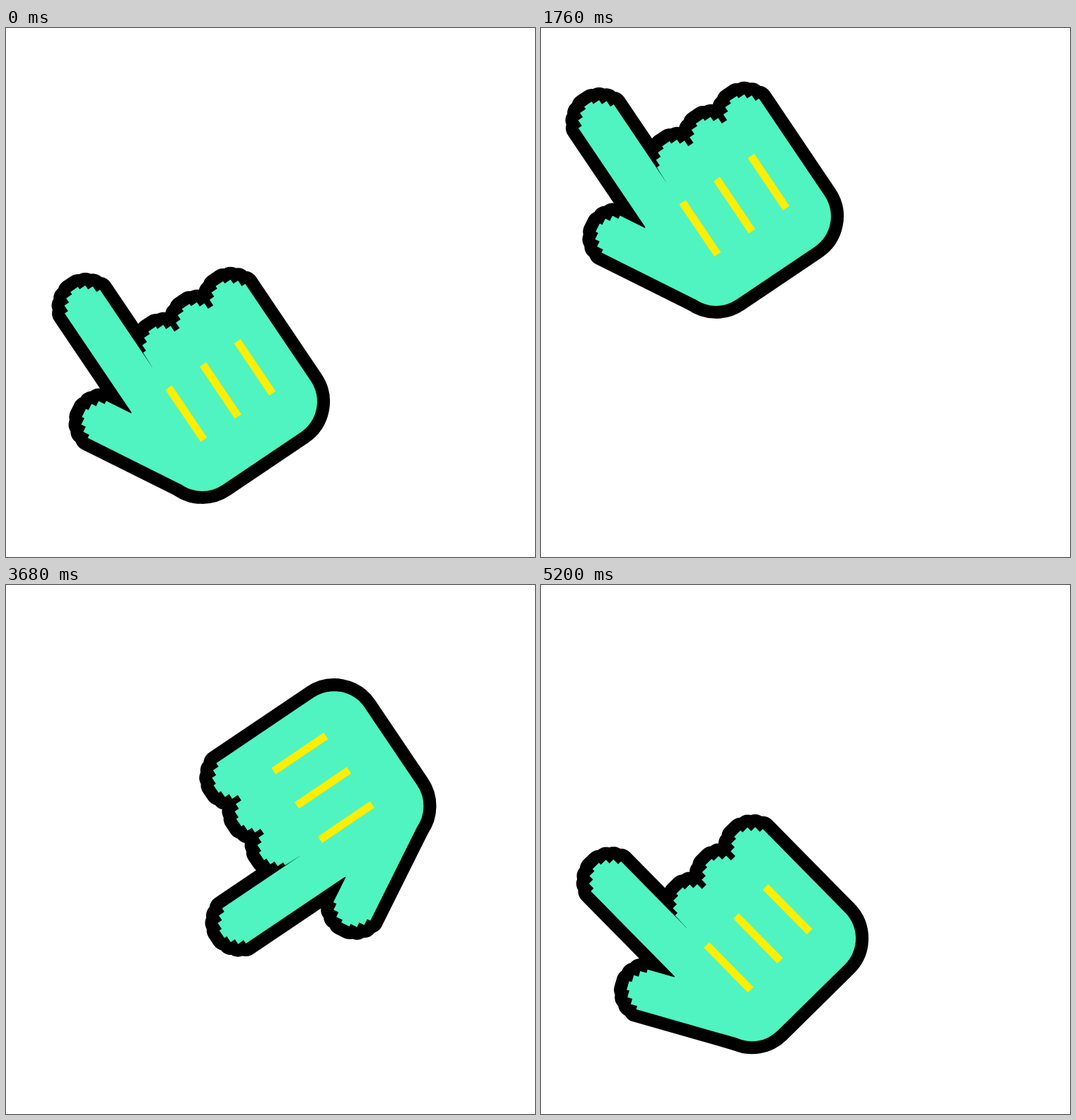
Animation, 748 px wide and 748 px high, one loop 5240 ms. Source, as an HTML page:

```html
<!DOCTYPE html>
<html lang="en">
<head>
<meta charset="utf-8">
<title>Pointing hand</title>
<style>
  html, body { margin: 0; width: 100%; height: 100%; overflow: hidden; background: #fff; }
  svg { display: block; width: 100%; height: 100%; }
  #outline { stroke: #000; stroke-width: 36; stroke-linejoin: round; }
  #skin { fill: #4ff4c1; }
  #bars { stroke: #ffee00; stroke-width: 11; }
</style>
</head>
<body>
<svg viewBox="0 0 748 748">
  <g id="hand">
    <g id="outline"></g>
    <g id="skin"></g>
    <path id="bars" d="M-16.8 15v89M41.7 15v89M100.2 15v89"/>
  </g>
</svg>
<script>
const LOOP = 5240;
const R = 30.8;
const $ = id => document.getElementById(id);

// Round fingertip cut into stairs, drawn left to right
function tip(cx, cy) {
  const cos = a => R * Math.cos(a * Math.PI / 180);
  const sin = a => R * Math.sin(a * Math.PI / 180);
  let d = `V${cy - sin(18)}`;
  for (const a of [38, 58, 78]) d += `H${cx - cos(a)}V${cy - sin(a)}`;
  for (const a of [78, 58, 38]) d += `H${cx + cos(a)}V${cy - sin(a - 20)}`;
  return d;
}

const parts = {
  palm: 'M-19.2 -46' + tip(10, -36.5) + tip(67.4, -36.5) + tip(124.8, -36.5) +
        'H155V120A52 52 0 0 1 103 172H-30A52 52 0 0 1 -79 138L-85 40L-81 15.5L-20 -22Z',
  thumb: 'M0 0' + tip(29.2, 8.5) + 'H58.5V130L0 146Z',
  finger: 'M-80 -150' + tip(-50, -144.5) + 'H-20V30H-80Z'
};

const fingers = [];
for (const layer of ['outline', 'skin']) {
  for (const name in parts) {
    const path = document.createElementNS('http://www.w3.org/2000/svg', 'path');
    path.setAttribute('d', parts[name]);
    if (name === 'thumb') path.setAttribute('transform', 'translate(-151 11) rotate(-29.5)');
    if (name === 'finger') fingers.push(path);
    $(layer).append(path);
  }
}

// Each move: start time, duration, change
const moveX = [[520, 440, -30], [2160, 520, 290.4], [3400, 800, -260.4]];
const moveY = [[520, 440, -262], [2160, 520, 78], [3400, 800, 184]];
const turn = [[2160, 380, 85], [3400, 260, 185], [4800, 510, 90]];
const wiggle = start => [-18, 32, -32, 18].map((d, i) => [start + i * 170, 170, d]);
const bend = [...wiggle(1080), ...wiggle(4440)];

function ease(x) {
  x = Math.min(1, Math.max(0, x));
  return x * x * (3 - 2 * x);
}

const at = (moves, from, t) =>
  moves.reduce((v, [start, dur, d]) => v + d * ease((t - start) / dur), from);

function draw(t) {
  const x = at(moveX, 235.5, t), y = at(moveY, 486.5, t);
  $('hand').setAttribute('transform', `translate(${x} ${y}) rotate(${at(turn, -34, t)})`);
  const angle = at(bend, 0, t);
  for (const f of fingers) f.setAttribute('transform', `rotate(${angle} -50 -10)`);
}

const began = performance.now();
function tick() {
  draw((performance.now() - began) % LOOP);
  requestAnimationFrame(tick);
}
tick();
</script>
</body>
</html>
```
